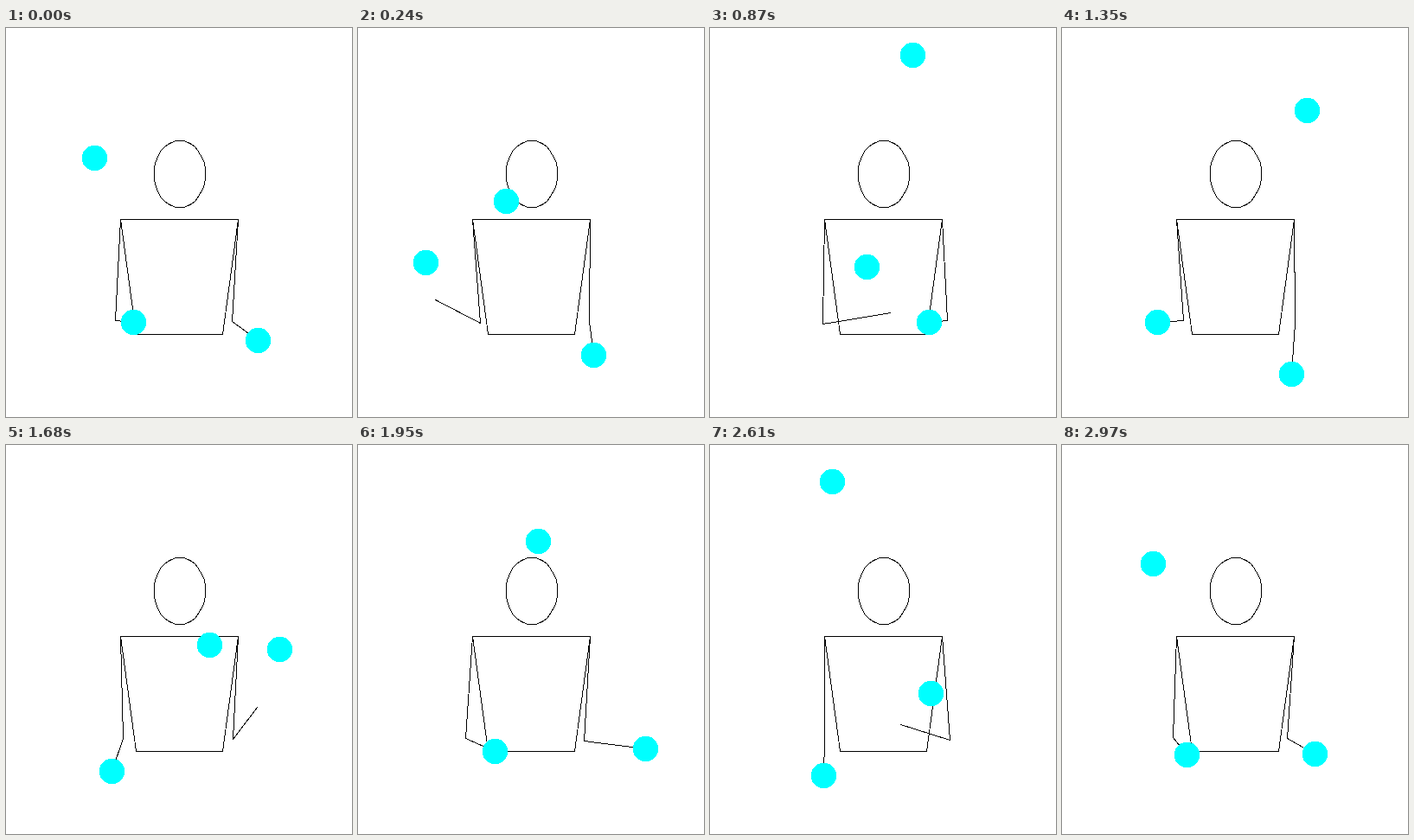
Write an HTML page that moves like this. It is 400x450 px and loops after 3000 ms.

```html
<!DOCTYPE html>
<html lang="en">
<head>
<meta charset="utf-8">
<title>Juggler</title>
<style>
  html, body { margin: 0; width: 100%; height: 100%; overflow: hidden; background: #fff; }
  svg { display: block; shape-rendering: crispEdges; }
  .lines { fill: none; stroke: #000; }
  .balls { fill: #0ff; }
</style>
</head>
<body>
<svg width="400" height="450" viewBox="0 0 400 450">
  <g transform="translate(.5 .5)">
    <g class="lines">
      <polygon class="head"/>
      <path d="M132 221H268L250 354H150Z"/>
      <polyline class="arm"/>
      <polyline class="arm"/>
    </g>
    <g class="balls">
      <circle r="14.8"/>
      <circle r="14.8"/>
      <circle r="14.8"/>
    </g>
  </g>
</svg>
<script>
const STEP = 30, STEPS = 100, LOOP = 3, G = 362.7, LEVEL = 340;
const SHOULDER = { x: 132, y: 221 }, UPPER = 121.2, LOWER = 118.2, DEPTH = 85;

// Left hand: time, x, velocity x, velocity y, arriving velocity x if different.
// Every throw and catch happens at the same level.
const HAND = [
  [0, 147, 100, -671],
  [.35, 67, -20, 200],
  [.6875, 141.4, 671, -59],
  [1.35, 110, -55, 145, -240],
  [2, 165, 147, -308],
  [2.35, 150, -130, 0],
  [3, 147, 100, -671],
];
const HOLDS = [[.35, .6875], [1.35, 2], [2.35, 3]];
// Throws of the left hand: start, end, from x, to x.
const THROWS = [[0, 1.85, 147, 333], [.6875, .85, 141.4, 250], [2, 2.85, 165, 290]];

const arms = document.querySelectorAll('.arm');
const circles = document.querySelectorAll('circle');

function setPoints(shape, points) {
  shape.setAttribute('points', points.map(p => p.x + ',' + p.y).join(' '));
}

function hermite(u, h, p, q, v, w) {
  const r = 1 - u;
  return (1 + 2 * u) * r * r * p + (3 - 2 * u) * u * u * q + h * u * r * (r * v - u * w);
}

function handAt(t) {
  const i = HAND.findIndex(k => k[0] > t);
  const a = HAND[i - 1], b = HAND[i];
  const h = b[0] - a[0], u = (t - a[0]) / h;
  return {
    x: hermite(u, h, a[1], b[1], a[2], b[4] ?? b[2]),
    y: hermite(u, h, LEVEL, LEVEL, a[3], b[3]),
  };
}

// The elbow hangs down in the upright plane through shoulder and hand.
function elbowFor(hand) {
  const dx = hand.x - SHOULDER.x, dy = hand.y - SHOULDER.y;
  const flat = Math.hypot(dx, DEPTH), dist = Math.hypot(flat, dy);
  const along = (UPPER ** 2 - LOWER ** 2 + dist ** 2) / (2 * dist);
  const drop = Math.sqrt(Math.max(0, UPPER ** 2 - along ** 2));
  const out = (along * flat - drop * dy) / dist;
  return {
    x: SHOULDER.x + dx / flat * out,
    y: SHOULDER.y + (along * dy + drop * flat) / dist,
  };
}

function ballsOf(t, hand) {
  const during = ([start, end]) => t >= start && t < end;
  const list = THROWS.filter(during).map(([start, end, from, to]) => ({
    x: from + (to - from) * (t - start) / (end - start),
    y: LEVEL - G * (t - start) * (end - t),
  }));
  return HOLDS.some(during) ? [...list, hand] : list;
}

function draw(step) {
  const balls = [];
  // The right side is the left side mirrored, half a loop later.
  [0, 1].forEach(side => {
    // The tiny shift keeps rounding from leaving a ball between flight and catch.
    const own = (step + side * STEPS / 2) % STEPS * LOOP / STEPS + 1e-6;
    const place = p => ({ x: Math.round(side ? 400 - p.x : p.x), y: Math.round(p.y) });
    const hand = handAt(own);
    setPoints(arms[side], [SHOULDER, elbowFor(hand), hand].map(place));
    balls.push(...ballsOf(own, hand).map(place));
  });
  balls.forEach((ball, i) => {
    circles[i].setAttribute('cx', ball.x);
    circles[i].setAttribute('cy', ball.y);
  });
}

setPoints(document.querySelector('.head'), Array.from({ length: 40 }, (_, i) => {
  const a = i * Math.PI / 20;
  return { x: Math.round(200.4 + 29.6 * Math.cos(a)), y: Math.round(168.4 + 38.6 * Math.sin(a)) };
}));

const begin = performance.now();
function tick() {
  draw(Math.floor((performance.now() - begin) / STEP) % STEPS);
  requestAnimationFrame(tick);
}
tick();
</script>
</body>
</html>
```
